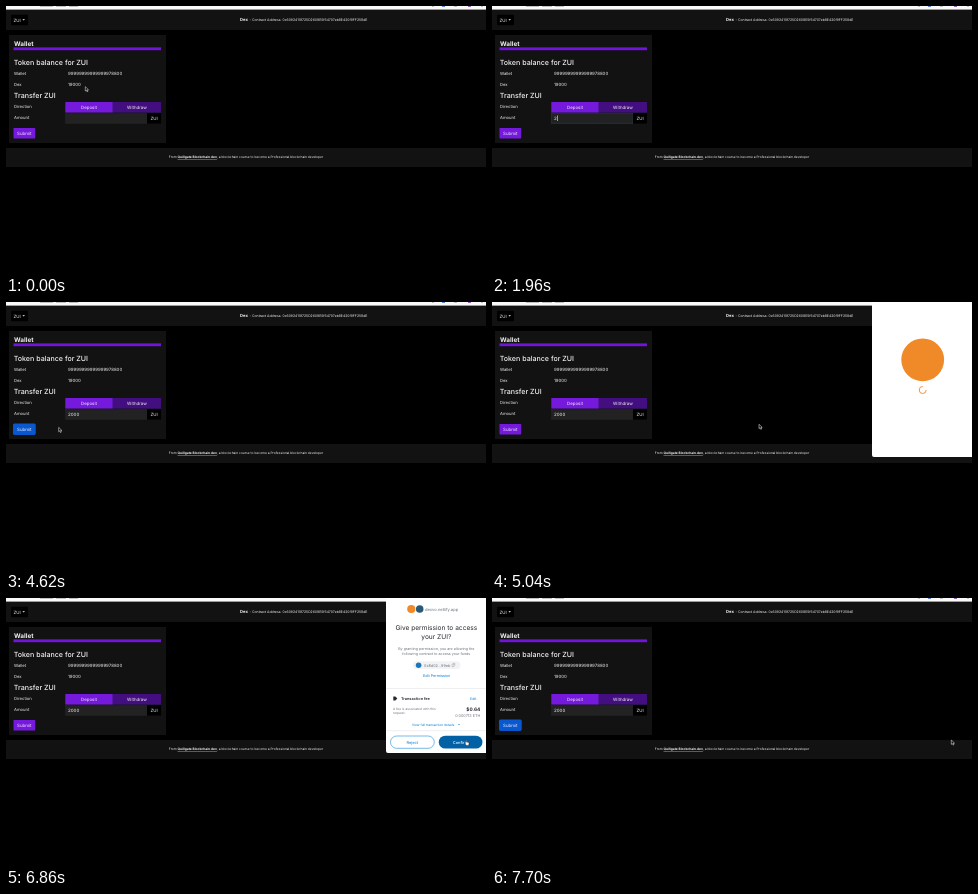
Write an HTML page that moves like this. It is 480 px wide and 268 px high and loops after 8000 ms.

```html
<!DOCTYPE html>
<html lang="en">
<head>
<meta charset="utf-8">
<title>Wallet</title>
<style>
  html, body { margin: 0; width: 100%; height: 100%; overflow: hidden; background: #000; }
  svg { display: block; width: 100%; height: 100%; }
  text { font: 4.4px Inter, "Open Sans", sans-serif; fill: #f4f4f4; text-rendering: geometricPrecision; white-space: pre; }
  .h { font-size: 7.1px; font-weight: 500; }
  .b { font-weight: 700; }
  .m { text-anchor: middle; }
  .e { text-anchor: end; }
  #popup text { fill: #24292e; }
  #popup .link { fill: #037dd6; }
  #popup .gray { fill: #6a737d; }
  #popup .on { fill: #fff; }
</style>
</head>
<body>
<svg viewBox="0 0 480 268">
  <rect width="480" height="268"/>
  <rect width="480" height="24" fill="#121212"/>
  <rect width="480" height="3.6" fill="#fafafa"/>
  <path d="M34 .3h13m3 0h10m3 0h9M426 .3h2m20 0h3m24 0h2" stroke="#999" stroke-width=".7"/>
  <path d="M436 .4h3" stroke="#4a7fd0"/>
  <path d="M462 .4h3" stroke="#8a50b0"/>
  <rect x="5" y="8.8" width="17" height="10.4" rx="1"/>
  <text x="7.5" y="15.6">ZUI</text>
  <path d="M16.4 13.2h2.6l-1.3 1.4z" fill="#fff"/>
  <text x="234" y="15.4" class="b" style="font-size:4.2px">Dex</text>
  <text x="243.5" y="15.3" style="font-size:3.45px">- Contract Address: 0x60924118725D2608E5f64707eb8E420f9FF258dE</text>

  <rect x="3" y="29" width="157" height="108" fill="#121212"/>
  <text x="8" y="39.6" class="b" style="font-size:6.4px">Wallet</text>
  <rect x="7.5" y="41.4" width="147.5" height="2.8" fill="#7215da"/>
  <text x="7.7" y="58.6" class="h">Token balance for ZUI</text>
  <text x="8" y="69.3" style="font-size:4.2px">Wallet</text>
  <text x="62" y="69.4">99999999999999978800</text>
  <text x="8" y="80" style="font-size:4.2px">Dex</text>
  <text x="62" y="80.1">19000</text>
  <text x="7.7" y="91.5" class="h">Transfer ZUI</text>
  <text x="8" y="102.4" style="font-size:4.2px">Direction</text>
  <rect x="59.3" y="96" width="47.5" height="10.6" fill="#7519dd"/>
  <rect x="106.8" y="96" width="48.2" height="10.6" fill="#430f80"/>
  <text x="83" y="102.8" class="m">Deposit</text>
  <text x="131" y="102.8" class="m">Withdraw</text>
  <text x="8" y="113.4" style="font-size:4.2px">Amount</text>
  <rect id="input" x="59.3" y="107.3" width="81.7" height="10" fill="#222" stroke-width=".8"/>
  <rect x="141" y="107" width="14" height="10.6"/>
  <text x="148" y="113.8" class="m">ZUI</text>
  <text id="amount" x="62" y="113.9" style="font-size:4.5px"></text>
  <rect id="caret" y="109.5" width=".6" height="5.5" fill="#eee"/>
  <rect id="submit" x="7.5" y="122" width="21.7" height="10.4" rx=".6"/>
  <text x="18.3" y="128.8" class="m">Submit</text>

  <rect y="142" width="480" height="19" fill="#121212"/>
  <text x="240" y="152.3" class="m" style="font-size:3.25px">From <tspan class="b" text-decoration="underline">Quillgate Blockchain.dev</tspan>, a blockchain course to become a Professional blockchain developer</text>

  <g id="popup">
    <path d="M380 0h100v155h-98q-2 0-2-2z" fill="#fff"/>
    <g id="loading">
      <circle cx="430.7" cy="57.8" r="21.4" fill="#f08a28"/>
      <path id="spinner" d="M430.7 84.5a3.5 3.5 0 1 0 3.5 3.5" fill="none" stroke="#f5913a" stroke-width="1"/>
    </g>
    <g id="request">
      <g id="icons">
        <circle cx="405.3" cy="11" r="4.1" fill="#f08a28"/>
        <circle cx="413.7" cy="11" r="3.8" fill="#285a78"/>
        <path d="M387.3 98.6h2l2 1.9-2 1.9h-2z" fill="#24292e"/>
      </g>
      <text x="419" y="12.5" class="gray" style="font-size:4.1px">dexvo.netlify.app</text>
      <text x="430.3" y="32.4" class="m" style="font-size:6.6px">Give permission to access</text>
      <text x="430.3" y="41.4" class="m" style="font-size:6.6px">your ZUI?</text>
      <text x="430.3" y="51.8" class="m gray" style="font-size:3.65px">By granting permission, you are allowing the</text>
      <text x="430.3" y="57.3" class="m gray" style="font-size:3.65px">following contract to access your funds</text>
      <rect x="407" y="63.3" width="47.5" height="7.8" rx="3.9" fill="#f2f3f4"/>
      <circle cx="412.6" cy="67.2" r="2.8" fill="#1b78b8"/>
      <text x="418" y="68.6" class="gray" style="font-size:3.8px">0x8d02...99eb</text>
      <path d="M446 66h2v2.6h-2zM447 65.2h1.8v2.5" fill="none" stroke="#888" stroke-width=".4"/>
      <text x="430.6" y="78.9" class="m link" style="font-size:3.75px">Edit Permission</text>
      <path d="M380 90.5h100M380 132.7h100" stroke="#e1e4e7" stroke-width=".6"/>
      <text x="395" y="101.9" style="font-size:3.85px;font-weight:600">Transaction fee</text>
      <text x="470.3" y="101.8" class="e link" style="font-size:3.5px">Edit</text>
      <text x="387" y="111.5" class="gray" style="font-size:3.25px">A fee is associated with this</text>
      <text x="387" y="116.2" class="gray" style="font-size:3.25px">request.</text>
      <text x="474.3" y="113.3" class="e b" style="font-size:4.8px">$0.64</text>
      <text x="474.3" y="119" class="e gray" style="font-size:3.8px">0.000713 ETH</text>
      <text x="406" y="127.7" class="link" style="font-size:3.25px">View full transaction details</text>
      <path d="M452 126l1 1 1-1" fill="none" stroke="#037dd6" stroke-width=".5"/>
      <rect x="384.5" y="138" width="43.8" height="12.3" rx="6.15" fill="#fff" stroke="#3c9be0" stroke-width=".7"/>
      <text x="406.3" y="145.6" class="m link" style="font-size:4px">Reject</text>
      <rect id="confirm" x="432.8" y="137.7" width="43.6" height="12.9" rx="6.45"/>
      <text x="454.5" y="145.6" class="m on" style="font-size:4px;font-weight:500">Confirm</text>
    </g>
  </g>

  <g id="cursor" stroke-linejoin="round">
    <path id="arrow" d="M0 0v4.3l1-.9.8 1.7.8-.4-.7-1.6h1.3z" fill="#000" stroke="#fff" stroke-width=".5"/>
    <path id="hand" d="M.4.5Q1-.2 1.3.6v1.5l2 .5q.6.3.4 1.3l-.5 1.5H1.2L-.6 3.5q.1-.8 1 0z" fill="#fff" stroke="#111" stroke-width=".4"/>
    <path id="beam" d="M-1-2.5h2M0-2.5v5M-1 2.5h2" fill="none" stroke="#bbb" stroke-width=".5"/>
  </g>
</svg>
<script>
const LOOP = 8000, STEP = 70;
const $ = id => document.getElementById(id);
const show = (id, on) => $(id).setAttribute("visibility", on ? "inherit" : "hidden");
const set = (id, name, value) => $(id).setAttribute(name, value);
const within = (t, a, b) => t >= a && t < b;
const mix = (a, b, k) => a + (b - a) * k;

// Pointer stops: time, x, y
const path = [
  [0, 79.3, 80.7], [490, 79.3, 80.7], [1050, 79, 112], [2660, 79, 112], [2870, 79, 102],
  [4060, 79, 102], [4340, 13, 126], [4480, 13, 126], [5040, 267, 122.3],
  [5250, 401, 125.5], [6090, 401, 125.5], [6860, 459.3, 142], [LOOP, 459.3, 142]
];

function pointer(t) {
  const i = path.findIndex(p => p[0] > t);
  const [a, b] = [path[i - 1], path[i]];
  const u = (t - a[0]) / (b[0] - a[0]), k = u * u * (3 - 2 * u);
  return [mix(a[1], b[1], k), mix(a[2], b[2], k)];
}

function draw(ms) {
  const t = Math.floor(ms % LOOP / STEP) * STEP;

  const typed = t < 1960 ? 0 : Math.min(4, 1 + Math.floor((t - 1960) / 140));
  $("amount").textContent = "2000".slice(0, typed);
  const focused = within(t, 1120, 3220);
  set("input", "stroke", focused ? "#17384f" : "#222");
  const off = within(t, 1260, 1750) || within(t, 2520, 2800) || t >= 3080;
  const dim = within(t, 1260, 1400) || within(t, 1610, 1750);
  show("caret", focused);
  set("caret", "x", 62.2 + 2.8 * typed);
  set("caret", "opacity", dim ? .5 : off ? 0 : 1);

  const blue = within(t, 4480, 4830) ? Math.min(1, (t - 4410) / 140)
    : t >= 7420 ? Math.min(1, (t - 7350) / 210) : 0;
  const rgb = [[117, 10], [25, 88], [221, 207]].map(([a, b]) => Math.round(mix(a, b, blue)));
  set("submit", "fill", `rgb(${rgb})`);
  set("submit", "stroke", blue ? `rgba(10,88,207,${blue})` : "none");

  show("popup", within(t, 4830, 7420));
  show("loading", t < 6090);
  show("request", t >= 6090);
  show("icons", t >= 6300);
  set("spinner", "transform", `rotate(${(t - 5040) * .5} 430.7 88)`);

  const [x, y] = pointer(t);
  const onConfirm = x > 433 && y > 137.5 && t < 7420;
  set("confirm", "fill", onConfirm ? "#0260a4" : "#037dd6");
  const beam = x < 141 && y > 107 && y < 118 && t < 4060;
  const hand = !beam && (within(t, 2730, 4200) || within(t, 4270, 4620) || onConfirm);
  show("cursor", !within(t, 1960, 2660));
  show("beam", beam);
  show("hand", hand);
  show("arrow", !beam && !hand);
  set("cursor", "transform", `translate(${x} ${y})`);
}

const start = performance.now();
(function tick() {
  draw(performance.now() - start);
  requestAnimationFrame(tick);
})();
</script>
</body>
</html>
```
